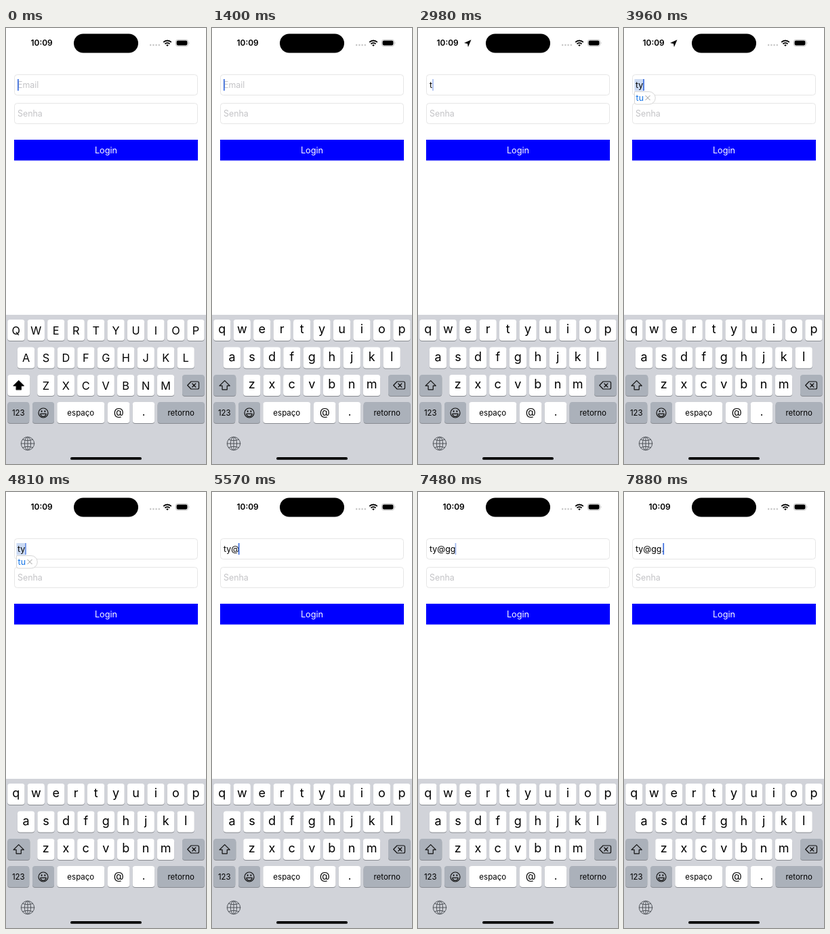
Animation of 295 by 640 pixels, one loop 8000 ms. Source, as an HTML page:

```html
<!DOCTYPE html>
<html lang="pt">
<head>
<meta charset="utf-8">
<title>Login</title>
<style>
html, body { margin: 0; width: 100%; height: 100%; overflow: hidden; background: #fff; }
svg { display: block; width: 295px; height: 640px; font: 12.4px Inter, "Liberation Sans", sans-serif; }
.mid { text-anchor: middle; }
.line { fill: none; stroke: #111; stroke-width: 1.2; stroke-linecap: round; stroke-linejoin: round; }
</style>
</head>
<body>
<svg viewBox="0 0 295 640">
  <text id="clock" y="26.4" font-size="11.9" font-weight="600">10:09</text>
  <path id="arrow" d="M78.5 17.2L68 22l5 .9.9 5z"/>
  <rect x="100" y="8.5" width="95" height="28" rx="14"/>
  <g fill="#c4c4c4">
    <circle cx="213.2" cy="25" r="1.2"/><circle cx="217.4" cy="25" r="1.2"/>
    <circle cx="221.6" cy="25" r="1.2"/><circle cx="225.8" cy="25" r="1.2"/>
  </g>
  <g fill="none" stroke="#000" stroke-width="1.8">
    <path d="M232.2 20.9a8.2 8.2 0 0 1 11.6 0M234.4 23.3a5.1 5.1 0 0 1 7.2 0"/>
    <path d="M238 27l-1.9-1.9a2.7 2.7 0 0 1 3.8 0z" fill="#000" stroke="none"/>
  </g>
  <rect x="250.4" y="17.4" width="18.2" height="9.2" rx="3" fill="none" stroke="#aaa" stroke-width=".8"/>
  <rect x="251.6" y="18.6" width="15.8" height="6.8" rx="1.8"/>
  <path d="M269.8 20.4q1.6 1.6 0 3.2z" fill="#aaa"/>

  <g fill="none" stroke="#e6e6e6">
    <rect x="12.5" y="68.5" width="270" height="30" rx="4"/>
    <rect x="12.5" y="110.5" width="270" height="30" rx="4"/>
  </g>
  <rect id="mark" x="15.5" y="75" width="13.5" height="17.5" fill="#cbdaf3"/>
  <text id="email" x="17" y="88"></text>
  <text x="17" y="130" fill="#c3c3c6">Senha</text>
  <rect id="caret" y="75" width="1.7" height="17" fill="#3c6ee0"/>
  <g id="hint">
    <path d="M15.5 93.5h21.5a9 9 0 0 1 0 18.5h-18.5q-3 0-3-3z" fill="#fff" stroke="#ccc" stroke-width=".8"/>
    <text x="17.6" y="107" fill="#1273e6">tu</text>
    <path d="M31.5 99l7 7m0-7l-7 7" stroke="#999" fill="none"/>
  </g>
  <rect x="12" y="164" width="271" height="30.5" fill="#00f"/>
  <text class="mid" x="147.5" y="184" font-size="12.7" fill="#fff">Login</text>

  <rect y="421" width="295" height="219" fill="#d1d3d9"/>
  <g id="keys"></g>
  <g class="line">
    <path id="shift" d="M18.7 517.6l7.6 7.6h-4v5.6h-7.2v-5.6h-4z"/>
    <path d="M273 519h9.500q2 0 2 2v7q0 2-2 2H273l-5.300-5.500zM274.800 522l5 5m0-5l-5 5"/>
    <circle cx="55" cy="565" r="7"/>
    <path d="M50.800 566.300h8.400q-.6 4-4.200 4t-4.200-4z"/>
    <path d="M52.600 562v1.200M57.400 562v1.200" stroke-width="1.700"/>
  </g>
  <g class="line" stroke-width="1" style="stroke:#50545a;stroke-width:1">
    <circle cx="32" cy="610" r="9.700"/>
    <ellipse cx="32" cy="610" rx="4.600" ry="9.700"/>
    <path d="M22.300 610h19.400M32 600.300v19.400M24.500 604q7.500 3.500 15 0M24.500 616q7.500-3.500 15 0"/>
  </g>
  <rect x="95" y="630" width="105" height="3.800" rx="1.900"/>
  <g id="popup">
    <path fill="#fff" style="filter:drop-shadow(0 .5px .8px #0004)"/>
    <text class="mid" font-size="27"></text>
  </g>
</svg>
<script>
const LOOP = 8000, KEY_H = 31;
const $ = id => document.getElementById(id);
const typed = 'ty@gg.';
const caretX = [17, 21.2, 28.2, 38.8, 46, 54.6, 57.4];
const keys = {};
const letters = [];

function addKey(label, x, y, w, size, fill = '#fff') {
  $('keys').insertAdjacentHTML('beforeend',
    `<rect x="${x}" y="${y + 1}" width="${w}" height="${KEY_H}" rx="4" fill="#898c92"/>
     <rect x="${x}" y="${y}" width="${w}" height="${KEY_H}" rx="4" fill="${fill}"/>
     <text class="mid" x="${x + w / 2}" y="${y + 20}" font-size="${size}">${label}</text>`);
  keys[label] = { x, y, w };
  return $('keys').lastElementChild;
}

[['qwertyuiop', 2.2, 428], ['asdfghjkl', 16.9, 468.5], ['zxcvbnm', 46.2, 509]].forEach(([row, x, y]) =>
  [...row].forEach((ch, i) => letters.push({ ch, y, node: addKey(ch, x + i * 29.45, y, 25.3, 18) })));

const GREY = '#abb1ba';
const shiftFace = addKey('', 2.3, 509, 33, 12, GREY).previousElementSibling;
addKey('', 260, 509, 32.7, 12, GREY);
addKey('123', 2.3, 549, 32, 11.5, GREY);
addKey('', 39, 549, 32, 12, GREY);
addKey('espaço', 75.3, 549, 70, 11.5).setAttribute('y', 568.5);
addKey('@', 150, 549, 32.5, 15.5);
addKey('.', 186.7, 549, 32.5, 16);
addKey('retorno', 223.6, 549, 69.2, 11.5, GREY).setAttribute('y', 568.5);

// Each entry changes part of the state from its time on.
const steps = [
  [0, { caps: true, count: 0, caret: 1, press: '', hint: false }],
  [370, { caret: .5 }], [480, { caret: 0 }], [720, { caret: .5 }], [840, { caret: 1 }],
  [1140, { caret: 0 }], [1400, { caps: false, caret: 1 }],
  [1510, { press: 't' }], [1740, { press: '', count: 1 }],
  [2240, { caret: 0 }], [2510, { caret: .5 }], [2620, { caret: 1 }],
  [2860, { caret: .75 }], [2980, { caret: .45 }],
  [3520, { press: 'y', caret: 1 }], [3740, { press: '', count: 2 }], [3960, { hint: true }],
  [4700, { caret: .85 }], [4810, { caret: .7 }], [4930, { press: '@', caret: 0 }],
  [5570, { press: '', count: 3, hint: false, caret: 1 }],
  [5680, { caret: 0 }], [5920, { caret: .5 }], [6040, { caret: 1 }],
  [6310, { press: 'g', caret: .5 }], [6450, { press: '', count: 4, caret: 1 }],
  [6600, { press: 'g' }], [6860, { press: '', count: 5 }],
  [7240, { caret: 0 }], [7480, { caret: .5 }], [7590, { caret: 1 }],
  [7750, { press: '.' }], [7880, { press: '', count: 6 }]
];

const show = (node, visible) => node.style.display = visible ? '' : 'none';
const ramp = (t, from, to) => Math.min(1, Math.max(0, (t - from) / (to - from)));

function drawPopup(label) {
  show($('popup'), label);
  if (!label) return;
  const { x, y, w } = keys[label], [shape, text] = $('popup').children;
  const l = x - 11, r = x + w + 11.5, right = x + w, top = y - 49;
  shape.setAttribute('d', `M${l + 9} ${top}H${r - 9}q9 0 9 9V${y - 18}
    c0 9-${r - right} 8-${r - right} 19V${y + KEY_H - 4}q0 4-4 4H${x + 4}q-4 0-4-4V${y + 1}
    c0-11-11-10-11-19V${top + 9}q0-9 9-9z`);
  text.textContent = label;
  text.setAttribute('x', x + w / 2);
  text.setAttribute('y', top + 30);
}

function setCase(caps) {
  for (const { ch, y, node } of letters) {
    node.textContent = caps ? ch.toUpperCase() : ch;
    node.setAttribute('font-size', caps ? 16.3 : 18);
    node.setAttribute('y', y + (caps ? 21.5 : 20));
  }
  shiftFace.setAttribute('fill', caps ? '#fff' : GREY);
  $('shift').style.fill = caps ? '#000' : 'none';
}

let lastStep = -1;
function render(now) {
  const t = now % LOOP;
  const located = ramp(t, 1740, 2060) - ramp(t, 4070, 4400);
  $('clock').setAttribute('x', 36.6 - 9 * located);
  $('arrow').style.opacity = located;

  const past = steps.filter(([time]) => time <= t);
  if (past.length !== lastStep) {
    lastStep = past.length;
    const state = Object.assign({}, ...past.map(step => step[1]));
    setCase(state.caps);
    drawPopup(state.press);
    show($('hint'), state.hint);
    show($('mark'), state.hint);
    $('email').textContent = typed.slice(0, state.count) || 'Email';
    $('email').setAttribute('fill', state.count ? '#000' : '#c3c3c6');
    $('caret').setAttribute('x', caretX[state.count]);
    $('caret').style.opacity = state.caret;
  }
  requestAnimationFrame(render);
}
requestAnimationFrame(render);
</script>
</body>
</html>
```
